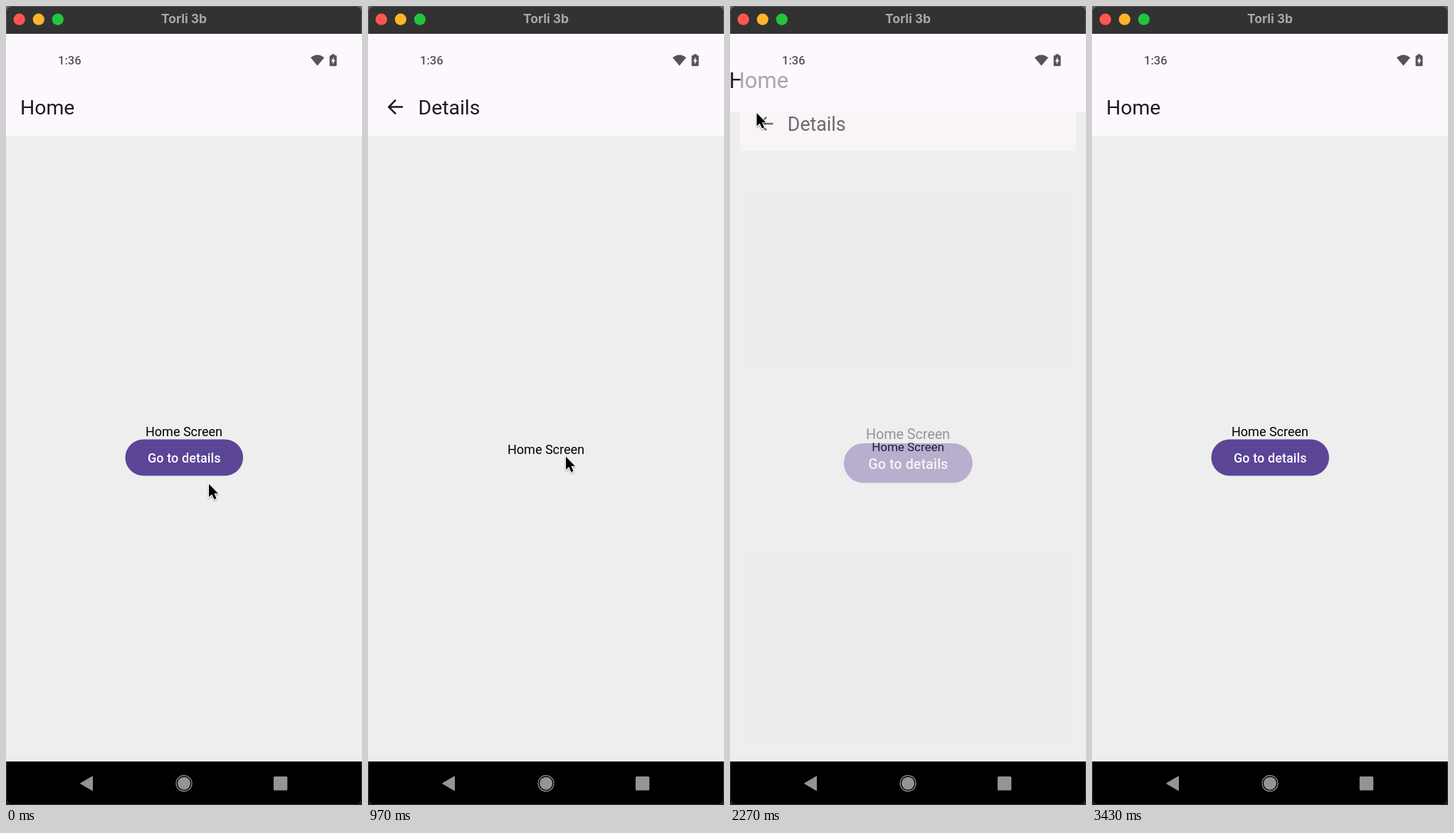
Write an HTML page that moves like this. It is 500 by 1120 pixels and loops after 3460 ms.

```html
<!DOCTYPE html>
<html lang="en">
<head>
<meta charset="utf-8">
<title>Screen navigation</title>
<style>
html, body { margin: 0; width: 100%; height: 100%; overflow: hidden; background: #222; }
svg { display: block; width: 500px; height: 1120px; font-family: Roboto, sans-serif; }
.title { font-size: 28.4px; fill: #1d1b20; }
.body { font-size: 18px; text-anchor: middle; fill: #000; }
.label { font-size: 17.9px; font-weight: 500; letter-spacing: .13px; text-anchor: middle; fill: #fff; }
.clock { font-size: 16.6px; font-weight: 500; fill: #57525a; }
.window { font: 700 17.4px Inter, sans-serif; text-anchor: middle; fill: #a9a9a9; }
</style>
</head>
<body>
<svg viewBox="0 0 500 1120">
  <defs>
    <clipPath id="frameClip"><rect width="500" height="1120" rx="10"/></clipPath>
    <clipPath id="screenClip"><rect y="39" width="500" height="1020"/></clipPath>
    <clipPath id="buttonClip"><rect x="167.5" y="607.5" width="165.5" height="51" rx="25.5"/></clipPath>
    <radialGradient id="glow">
      <stop offset=".4" stop-color="#fff" stop-opacity=".24"/>
      <stop offset="1" stop-color="#fff" stop-opacity="0"/>
    </radialGradient>
    <filter id="shadow" x="-50%" y="-50%" width="200%" height="200%">
      <feDropShadow dx="0" dy="1.5" stdDeviation="1.2" flood-opacity=".35"/>
    </filter>
    <g id="page">
      <rect y="39" width="500" height="1020" fill="#eee"/>
      <rect y="39" width="500" height="143" fill="#fdf8fe"/>
    </g>
  </defs>

  <rect width="500" height="20" fill="#6b675f"/>
  <g clip-path="url(#frameClip)">
    <rect width="500" height="1120"/>
    <rect width="500" height="39" fill="#323232"/>
    <circle cx="18.7" cy="18.7" r="8.1" fill="#ff5750"/>
    <circle cx="45.8" cy="18.7" r="8.1" fill="#ffb429"/>
    <circle cx="72.8" cy="18.7" r="8.1" fill="#22c63c"/>
    <text class="window" x="250" y="24.3">Torli 3b</text>

    <g clip-path="url(#screenClip)">
      <g id="home">
        <use href="#page"/>
        <text class="title" x="20" y="152">Home</text>
        <text class="body" x="250" y="602.5">Home Screen</text>
        <g clip-path="url(#buttonClip)">
          <rect x="160" y="600" width="180" height="65" fill="#5b4597"/>
          <circle id="ripple" fill="url(#glow)"/>
        </g>
        <text class="label" x="250.3" y="640.3">Go to details</text>
      </g>
      <g id="details">
        <use href="#page"/>
        <path d="M49 141.5H30M39 131.7L29.2 141.5L39 151.3" fill="none" stroke="#1d1b20" stroke-width="2.5"/>
        <text class="title" x="70.5" y="152">Details</text>
        <text class="body" x="250" y="628.3">Home Screen</text>
      </g>
      <text class="clock" x="73" y="82">1:36</text>
      <g fill="#57525a">
        <path d="M427.8 72.2Q437.4 64.6 447 72.2L437.4 83.8Z"/>
        <path d="M457.3 67.6h4.4v1.7h1.6q1.2 0 1.2 1.2v12.5q0 1.2-1.2 1.2h-7.6q-1.2 0-1.2-1.2v-12.5q0-1.2 1.2-1.2h1.6z"/>
        <path d="M460.3 71.5L456.7 77.7H458.8V82L462.4 75.8H460.3Z" fill="#fdf8fe"/>
      </g>
    </g>

    <g fill="#949494">
      <path d="M104.5 1089.8L121.5 1079.8V1099.8Z" stroke="#949494" stroke-linejoin="round"/>
      <circle cx="250" cy="1089.7" r="9"/>
      <circle cx="250" cy="1089.7" r="11" fill="none" stroke="#949494" stroke-width="1.2"/>
      <rect x="375.8" y="1080" width="19.4" height="19.4" rx="1.5"/>
    </g>
    <path d="M.5 39V10Q.5 .5 10 .5H490Q499.5 .5 499.5 10V39" fill="none" stroke="#666" opacity=".8"/>
    <path d="M.5 1059V1110Q.5 1119.5 10 1119.5H490Q499.5 1119.5 499.5 1110V1059" fill="none" stroke="#3a3a3a"/>
    <g id="cursor" filter="url(#shadow)">
      <path d="M0 0V18.3L4.2 14.4L7.3 21.6L10.5 20.2L7.4 13.2H12.9Z"
            stroke="#fff" stroke-width="1.7" stroke-linejoin="round" paint-order="stroke"/>
    </g>
  </g>
</svg>
<script>
const LOOP = 3460, OPEN = 567, CLOSE = 2205, DURATION = 400, PRESS = 390;
const [home, details, ripple, cursor] =
  ['home', 'details', 'ripple', 'cursor'].map(id => document.getElementById(id));

// Pointer tip: time, x, y
const path = [
  [0, 285, 670], [60, 285, 669], [330, 281, 642], [600, 281, 641],
  [850, 280, 638], [970, 278, 632], [1070, 275, 603], [1250, 183, 372],
  [1430, 94, 189], [1600, 52, 158], [1800, 37, 150], [2150, 37, 150],
  [2370, 38, 150], [2750, 38, 150], [3000, -30, 148], [LOOP, -30, 148]
];

const clamp = v => Math.min(1, Math.max(0, v));
const ramp = (t, start, length) => clamp((t - start) / length);
const mix = (a, b, k) => a + (b - a) * k;

function bezier(a, b, c, d, u) {
  const v = 1 - u;
  return a * v * v * v + 3 * b * v * v * u + 3 * c * v * u * u + d * u * u * u;
}

// Fast start with a very slow finish, built from two joined curves
function ease(x) {
  if (x <= 0 || x >= 1) return clamp(x);
  const [xs, ys] = x < 1 / 6
    ? [[0, .05, .13333, 1 / 6], [0, 0, .06, .4]]
    : [[1 / 6, .20833, .25, 1], [.4, .82, 1, 1]];
  let low = 0, high = 1;
  for (let i = 0; i < 24; i++) {
    const mid = (low + high) / 2;
    if (bezier(...xs, mid) < x) low = mid; else high = mid;
  }
  return bezier(...ys, low);
}

function zoom(node, s) {
  node.setAttribute('transform', `translate(250 549) scale(${s}) translate(-250 -549)`);
}

function drawRipple(t) {
  const grow = 1 - (1 - ramp(t, PRESS, 210)) ** 2;
  ripple.setAttribute('cx', mix(281, 250, grow));
  ripple.setAttribute('cy', mix(643, 633, grow));
  ripple.setAttribute('r', mix(28, 88, grow));
  ripple.setAttribute('opacity', ramp(t, PRESS, 75) * (1 - ramp(t, 620, 150)));
}

function drawCursor(t) {
  const i = path.findIndex(p => p[0] > t);
  const [t0, x0, y0] = path[i - 1], [t1, x1, y1] = path[i];
  const k = ramp(t, t0, t1 - t0);
  cursor.setAttribute('transform', `translate(${mix(x0, x1, k)} ${mix(y0, y1, k)})`);
}

function draw(now) {
  const t = now % LOOP;
  const shown = ease(ramp(t, OPEN, DURATION)) - ease(ramp(t, CLOSE, DURATION));
  zoom(home, mix(1, 1.15, shown));
  zoom(details, mix(.85, 1, shown));
  details.setAttribute('opacity', ramp(t, OPEN + 50, 83) - ramp(t, CLOSE + 35, 83));
  drawRipple(t);
  drawCursor(t);
}

const start = performance.now();
function tick() {
  draw(performance.now() - start);
  requestAnimationFrame(tick);
}
tick();
</script>
</body>
</html>
```
